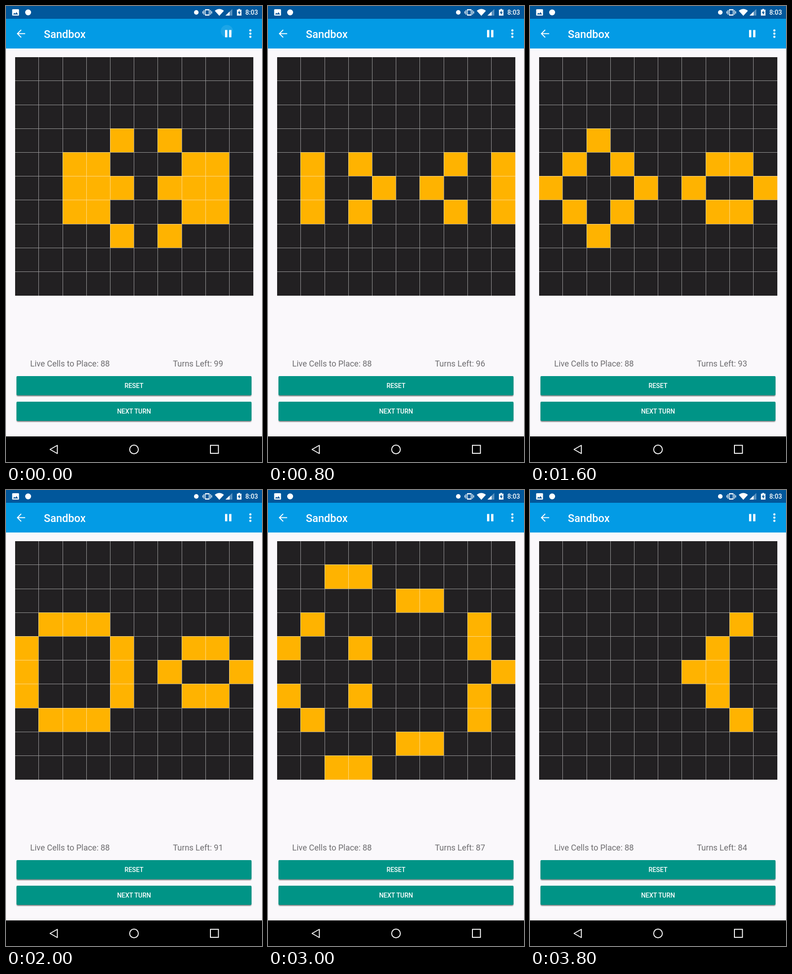
Write an HTML page that moves like this. It is 561 px wide and 998 px high and loops after 4000 ms.

```html
<!DOCTYPE html>
<html lang="en">
<head>
<meta charset="utf-8">
<title>Sandbox</title>
<style>
  html, body { margin: 0; width: 100%; height: 100%; overflow: hidden; background: #faf8fb; }
  svg { display: block; width: 561px; height: 998px; }
  text { font-family: Roboto, "Open Sans", sans-serif; fill: #fff; }
  .label { font-size: 18px; fill: #6e6d70; text-anchor: middle; }
  .button text { font-size: 14px; font-weight: 500; text-anchor: middle; }
  .button .face { fill: #009486; }
  .line { fill: none; stroke: #fff; stroke-width: 2; }
</style>
</head>
<body>
<svg viewBox="0 0 561 998">
  <defs>
    <filter id="blur" x="-5%" y="-20%" width="110%" height="150%"><feGaussianBlur stdDeviation="1.3"/></filter>
  </defs>
  <rect width="561" height="998" fill="#faf8fb"/>

  <!-- status bar -->
  <rect width="561" height="28" fill="#01579b"/>
  <g fill="#fff">
    <path fill-rule="evenodd" d="M15 7h12q1.500 0 1.500 1.500v11q0 1.500-1.500 1.500H15q-1.500 0-1.500-1.500v-11Q13.500 7 15 7zM15.500 18.500h11l-3.500-5-2.800 3.600-2-2.400z"/>
    <circle cx="48.500" cy="14" r="6.500"/>
    <circle cx="417" cy="14" r="5"/>
    <path fill-rule="evenodd" d="M437 7h8q1 0 1 1v12q0 1-1 1h-8q-1 0-1-1V8q0-1 1-1zM437.500 9.500v9h7v-9z"/>
    <path d="M433 9h1.500v10H433zM430.500 11.500h1.500v5h-1.500zM447.500 9h1.500v10h-1.500zM450 11.500h1.500v5H450z"/>
    <path d="M457.500 10.500Q467.500 2.500 477.500 10.500L467.500 21.500z"/>
    <path d="M496 6.500v14.500h-15z" opacity=".35"/>
    <path d="M490 12.300v8.700h-9z"/>
    <path fill-rule="evenodd" d="M509 6.500h4V8h3v13h-10V8h3zM511.800 9.500l-4 6h2.700v4l4-6h-2.700z"/>
    <text x="524.500" y="19" font-size="14" font-weight="500">8:03</text>
  </g>

  <!-- app bar -->
  <rect y="28" width="561" height="65" fill="#039be5"/>
  <circle id="ripple" cx="484" cy="55" r="13.500" fill="#fff" opacity=".1"/>
  <path class="line" stroke-width="2.300" d="M42 60.500H25.500M33.300 52.200L25 60.500l8.300 8.300"/>
  <text x="83" y="69.500" font-size="23.500" font-weight="500">Sandbox</text>
  <g fill="#fff">
    <path d="M480 52.500h5v16h-5zM489 52.500h5v16h-5z"/>
    <circle cx="535.500" cy="53.500" r="2.400"/>
    <circle cx="535.500" cy="60.500" r="2.400"/>
    <circle cx="535.500" cy="67.500" r="2.400"/>
  </g>

  <!-- board -->
  <rect x="20" y="112" width="522" height="522" fill="#222022"/>
  <path id="live" fill="#ffb300"/>
  <path id="grid" fill="#fff" opacity=".55"/>

  <text class="label" x="140.250" y="789">Live Cells to Place: 88</text>
  <text class="label" id="turns" x="420.750" y="789"></text>

  <g class="button">
    <rect x="23.500" y="812" width="514" height="42" rx="2" opacity=".5" filter="url(#blur)"/>
    <rect class="face" x="23" y="810" width="515" height="42" rx="2"/>
    <text x="280.500" y="836.300">RESET</text>
  </g>
  <g class="button">
    <rect x="23.500" y="868" width="514" height="42" rx="2" opacity=".5" filter="url(#blur)"/>
    <rect class="face" x="23" y="866" width="515" height="42" rx="2"/>
    <text x="280.500" y="892.300">NEXT TURN</text>
  </g>

  <!-- navigation bar -->
  <rect y="942" width="561" height="56"/>
  <path class="line" stroke-linejoin="round" d="M96.500 970.500l16-9v18z"/>
  <circle class="line" cx="280.500" cy="970.500" r="9.500"/>
  <rect class="line" x="448" y="961.500" width="17.500" height="17.500"/>
</svg>
<script>
const SIZE = 10, PITCH = 52.2, LOOP = 4000, TICK = 200;
const get = id => document.getElementById(id);
const edgeX = c => Math.floor(19.6 + PITCH * c);
const edgeY = r => Math.floor(111.6 + PITCH * r);

const start = [
  "..........", "..........", "..........",
  "....#.#...",
  "..##...##.",
  "..###.###.",
  "..##...##.",
  "....#.#...",
  "..........", ".........."
].map(row => [...row].map(c => c === "#"));

// Conway's rules; everything beyond the edge is dead.
function evolve(board) {
  return board.map((row, r) => row.map((alive, c) => {
    let n = 0;
    for (let y = r - 1; y <= r + 1; y++)
      for (let x = c - 1; x <= c + 1; x++)
        if ((y !== r || x !== c) && board[y]?.[x]) n++;
    return n === 3 || (alive && n === 2);
  }));
}

const boards = [start];
while (boards.length < 16) boards.push(evolve(boards.at(-1)));

let lines = "";
for (let i = 1; i < SIZE; i++)
  lines += `M${edgeX(i)} 112h1v522h-1zM20 ${edgeY(i)}h522v1h-522z`;
get("grid").setAttribute("d", lines);

function cellPath(board) {
  let d = "";
  board.forEach((row, r) => row.forEach((alive, c) => {
    const x = c ? edgeX(c) : 20, y = r ? edgeY(r) : 112;
    if (alive) d += `M${x} ${y}H${edgeX(c + 1) + (c === 9)}V${edgeY(r + 1) + (r === 9)}H${x}z`;
  }));
  return d;
}

let shown = -1;
function draw(now) {
  const t = Math.floor(now % LOOP / TICK) * TICK;
  // One turn every 255 ms, seen on a 200 ms clock.
  const turn = Math.floor((t + 105) / 255);
  if (turn !== shown) {
    shown = turn;
    get("live").setAttribute("d", cellPath(boards[turn]));
    get("turns").textContent = `Turns Left: ${99 - turn}`;
    get("ripple").style.display = turn ? "none" : "";
  }
}

const begin = performance.now();
function loop() {
  draw(performance.now() - begin);
  requestAnimationFrame(loop);
}
loop();
</script>
</body>
</html>
```
